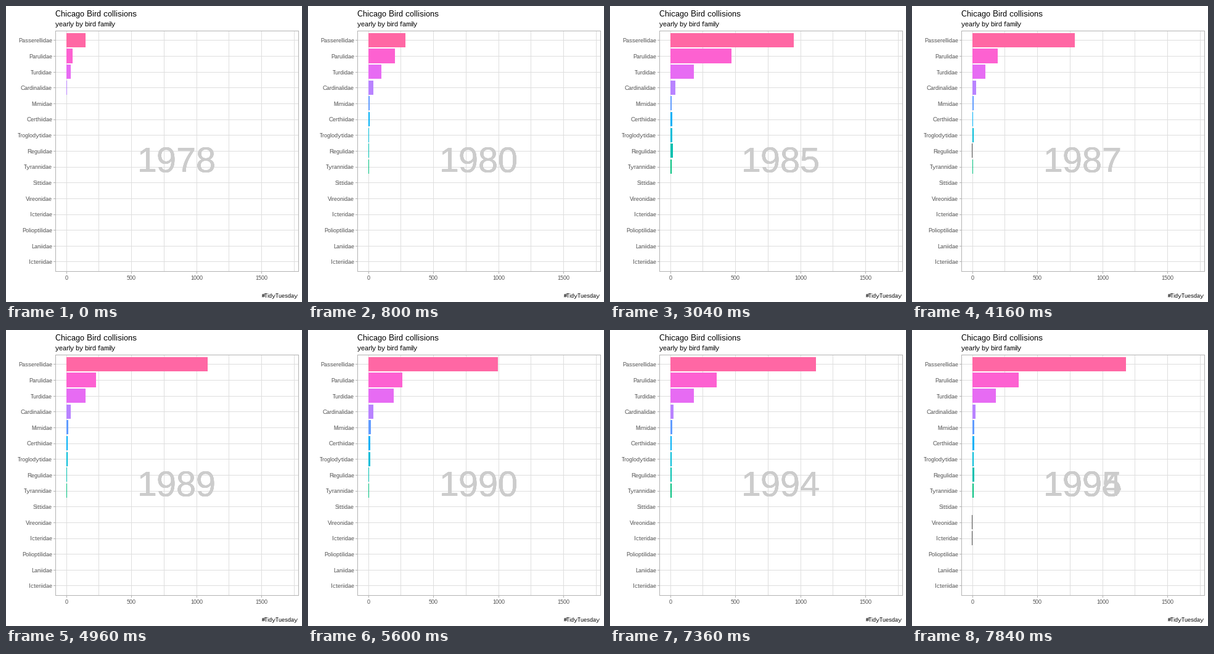
A matplotlib script for the animation above (8 s loop, 480 by 480 pixels).

```python
import math

import matplotlib.pyplot as plt
import numpy as np
from matplotlib.animation import FuncAnimation
from matplotlib.patches import Rectangle

# Whole-pixel glyph hinting without kerning, as on a desktop screen.
plt.rcParams.update({
    "font.family": "Liberation Sans",
    "text.hinting": "native",
    "text.hinting_factor": 1,
    "text.kerning_factor": 6,
})
SIZE, DPI = 480, 72
LEFT, RIGHT, TOP, BOTTOM = 80, 474, 40, 430
ZERO, SCALE = 97.7, 0.211
BAR_LEFT = round(ZERO)
ROW0, PITCH = 55.83, 25.652
FIRST_YEAR = 1978

FAMILIES = ["Passerellidae", "Parulidae", "Turdidae", "Cardinalidae", "Mimidae",
            "Certhiidae", "Troglodytidae", "Regulidae", "Tyrannidae", "Sittidae",
            "Vireonidae", "Icteridae", "Polioptilidae", "Laniidae", "Icteriidae"]
COLORS = ["#FF67A4", "#FD61D1", "#E76BF3", "#B983FF", "#619CFF",
          "#00B0F6", "#00BCD8", "#00C0AF", "#00BF7D", "#00BA38",
          "#6BB100", "#A3A500", "#C99800", "#E58700", "#F8766D"]
SINGLE_SIGHTINGS = {"Sittidae": (1981, 1986), "Vireonidae": (1994,),
                    "Icteridae": (1983, 1985, 1986, 1994)}


def path(year, *points):
    """Straight segments through counts at the turning points of the series."""
    return np.interp(year, [1978, 1982, 1984.5, 1987, 1990, 1992, 1994.5], points)


def wave(year, mean, swing, peak, period):
    return mean + swing * math.cos(2 * math.pi * (year - peak) / period)


def counts(year):
    trend = path(year, 277, 556, 920, 917, 1126, 936, 1136)
    result = {
        "Passerellidae": wave(year, trend, 260, 1985, 3),
        "Parulidae": path(year, 47, 365, 518, 194, 261, 356, 356),
        "Turdidae": path(year, 33, 166, 192, 100, 194, 190, 179),
        "Cardinalidae": path(year, 5, 71, 35, 28, 38, 24, 24),
    }
    if year > FIRST_YEAR:
        ramp = min(1, (year - FIRST_YEAR + 1) / 5)
        kinglets = path(year, 1, 9, 22, 1, 7, 9, 14)
        result |= {
            "Mimidae": ramp * wave(year, 14, 5, 1991, 14),
            "Certhiidae": ramp * wave(year, 10.5, 6, 1984.5, 5),
            "Troglodytidae": ramp * wave(year, 12, 3, 1983.25, 7.5),
            "Regulidae": kinglets,
            "Tyrannidae": 3.5 + kinglets / 2,
        }
    result |= {f: 1 for f, years in SINGLE_SIGHTINGS.items() if year in years}
    return result


def state(frame):
    """Bar values and visible year labels; every third frame is a halfway tween."""
    year = FIRST_YEAR + (frame + 1) // 3
    now = counts(year)
    if frame % 3 != 1:
        return now, [year]
    after = counts(year + 1)
    values = {f: (v + after.get(f, v)) / 2 for f, v in now.items()}
    leaving = any(f not in after for f in now)
    return values, [year, year + 1] if leaving else [year + 1]


fig = plt.figure(figsize=(SIZE / DPI, SIZE / DPI), dpi=DPI, facecolor="white")
ax = fig.add_axes([0, 0, 1, 1])
ax.set(xlim=(0, SIZE), ylim=(SIZE, 0))
ax.axis("off")


def box(x, y, w, h, color, z):
    patch = Rectangle((x, y), w, h, facecolor=color, linewidth=0,
                      antialiased=False, zorder=z)
    return ax.add_patch(patch)


def write(x, y, text, size, color="black", ha="left"):
    return ax.text(x, y, text, fontsize=size, color=color, ha=ha,
                   va="baseline", zorder=4)


GRID, EDGE, LABEL, SLIVER = "#DEDEDE", "#B3B3B3", "#4D4D4D", "#595959"

for value in range(0, 1751, 250):
    x = round(ZERO + SCALE * value)
    box(x, TOP, 1, BOTTOM - TOP, GRID, 1)
    if value % 500 == 0:
        box(x, BOTTOM + 1, 1, 3, EDGE, 3)
        write(x, 444, str(value), 9, LABEL, "center")

bars = []
for i, (family, color) in enumerate(zip(FAMILIES, COLORS)):
    center = ROW0 + PITCH * i
    y = int(center)
    box(LEFT, y, RIGHT - LEFT, 1, GRID, 1)
    box(LEFT - 3, y, 3, 1, EDGE, 3)
    write(75, round(center + 3.4), family, 9, LABEL, "right")
    top = int(center - 0.45 * PITCH)
    bottom = int(center + 0.45 * PITCH)
    bars.append(box(BAR_LEFT, top, 0, bottom - top, color, 2))

for x in (LEFT, RIGHT):
    box(x, TOP, 1, BOTTOM - TOP + 1, EDGE, 3)
for y in (TOP, BOTTOM):
    box(LEFT, y, RIGHT - LEFT + 1, 1, EDGE, 3)

write(80, 17, "Chicago Bird collisions", 13)
write(80, 33, "yearly by bird family", 11)
write(474, 473, "#TidyTuesday", 9, ha="right")

# Stacked copies harden the edges of the big year label.
year_labels = [[write(277, 269.3, "", 57, "#CCCCCC", "center") for _ in range(5)]
               for _ in range(2)]


def draw(frame):
    values, years = state(frame)
    for family, color, bar in zip(FAMILIES, COLORS, bars):
        bar.set_visible(family in values)
        width = round(ZERO + SCALE * values.get(family, 0)) - BAR_LEFT
        bar.set_x(BAR_LEFT if width else BAR_LEFT - 1)
        bar.set_width(max(width, 1))
        bar.set_facecolor(color if width else SLIVER)
    for i, copies in enumerate(year_labels):
        for label in copies:
            label.set_text(str(years[i]) if i < len(years) else "")
    return bars


anim = FuncAnimation(fig, draw, frames=50, interval=160, repeat=True,
                     repeat_delay=0, init_func=lambda: draw(0))
plt.show()
```
